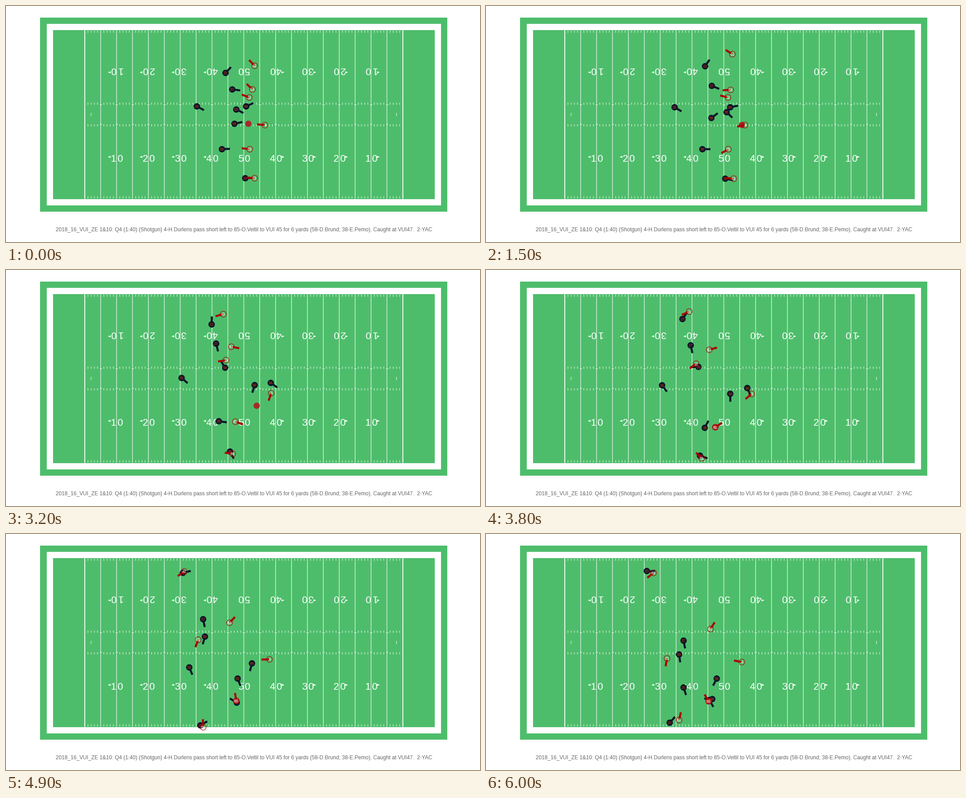
A matplotlib script for the animation above (6100 ms loop, 1058x529 px).

```python
import numpy as np
import matplotlib.pyplot as plt
from matplotlib.animation import FuncAnimation
from matplotlib.patches import Circle, Polygon, Rectangle

WIDTH, HEIGHT, DPI = 1058, 529, 64
FRAMES, INTERVAL = 61, 100
YARD, LEFT, BOTTOM, FIELD_W = 7.1, 104.8, 432.6, 160 / 3
GREEN, NAVY, ORANGE, RED, BROWN = "#4ebd6b", "#0b162a", "#c83803", "#aa0000", "#a52a2a"
RADIUS, STICK = 6.6, 17.8
DIGIT_HEIGHT = 0.7

plt.rcParams["font.family"] = "Liberation Sans"
fig = plt.figure(figsize=(WIDTH / DPI, HEIGHT / DPI), dpi=DPI, facecolor="white")
ax = fig.add_axes([0, 0, 1, 1])
ax.set_xlim(0, WIDTH)
ax.set_ylim(HEIGHT, 0)
ax.axis("off")


def pt(px):
    return px * 72 / DPI


def field_x(yards):
    return LEFT + YARD * np.asarray(yards, float)


def field_y(yards):
    return BOTTOM - YARD * np.asarray(yards, float)


def label(x, y, text, size, color, z, rotation=0):
    return ax.text(x, y, text, fontsize=pt(size), color=color, zorder=z, ha="center",
                   va="baseline", rotation=rotation, rotation_mode="anchor")


def slab(margin, color, z):
    ax.add_patch(Rectangle((field_x(-margin), field_y(-margin)),
                           YARD * (120 + 2 * margin), -YARD * (FIELD_W + 2 * margin),
                           facecolor=color, linewidth=0, zorder=z))


def vertical(yards, low, high, width=1.0):
    ax.vlines(field_x(yards), field_y(low), field_y(high), colors="white",
              linewidth=pt(width), zorder=1, snap=False)


def yard_number(yards, y, flip):
    """Two spaced digits, upside down on the far side, with a goal arrow."""
    x, size, spread = field_x(yards), 22, 7
    up = -1 if flip else 1
    for digit, offset in zip(str(50 - abs(yards - 60)), (-spread, spread)):
        label(x + up * offset, y + up * size * DIGIT_HEIGHT / 2, digit, size, "white", 1,
              rotation=180 if flip else 0)
    if yards != 60:
        side, arrow_y = np.sign(yards - 60), y - up * 3
        ax.add_patch(Polygon([(x + side * 19.7, arrow_y), (x + side * 13.4, arrow_y - 2.3),
                              (x + side * 13.4, arrow_y + 2.3)],
                             facecolor="white", linewidth=0, zorder=1))


def draw_field():
    slab(4, GREEN, 0)
    slab(2, "white", 0.1)
    slab(0, GREEN, 0.2)

    fives = np.arange(15, 110, 5)
    singles = [y for y in range(11, 110) if y % 5]
    vertical(fives, 0, FIELD_W, 1.1)
    vertical([10, 110], 0, FIELD_W, 1.9)
    hashes = (23.58, 29.75)
    tick = 2 / 3
    for low in (tick / 4, FIELD_W - tick * 1.25, hashes[0] - tick, hashes[1]):
        vertical(singles, low, low + tick)
    for y in hashes:
        ax.hlines([field_y(y)] * len(fives), field_x(fives - tick / 2),
                  field_x(fives + tick / 2), colors="white", linewidth=pt(1), zorder=1)
    vertical([12, 108], FIELD_W / 2 - 0.5, FIELD_W / 2 + 0.5)

    for yards in range(20, 101, 10):
        yard_number(yards, 341.3, flip=False)
        yard_number(yards, 145.7, flip=True)
    label(530.8, 505.3, "2018_16_VUI_ZE 1&10: Q4 (1:40) (Shotgun) 4-H.Durlens pass short "
          "left to 85-O.Veltil to VUI 45 for 6 yards (58-D.Brund; 38-E.Pemo). "
          "Caught at VUI47.  2-YAC", 11.88, "#666666", 1)


KEY_TIMES = np.array([0, 1500, 3200, 4900, 6000], float)
SNAP, HANDLED, THROW, CATCH = 1000, 1620, 2850, 3750
TURN, END = 3200, 6000


def spline(points, t):
    """Cubic Hermite path through the points at KEY_TIMES."""
    slopes = np.gradient(points, KEY_TIMES, axis=0)
    i = min(np.searchsorted(KEY_TIMES, t, side="right") - 1, len(KEY_TIMES) - 2)
    h = KEY_TIMES[i + 1] - KEY_TIMES[i]
    u = (t - KEY_TIMES[i]) / h
    return ((1 + 2 * u) * (1 - u) ** 2 * points[i] + u * (1 - u) ** 2 * h * slopes[i]
            + u * u * (3 - 2 * u) * points[i + 1] + u * u * (u - 1) * h * slopes[i + 1])


def heading(turn, t):
    """Ease between three headings, turning fastest around the throw."""
    first, middle, last = turn
    if t < TURN:
        return first + (middle - first) * (t / TURN) ** 2
    return last + (middle - last) * ((END - t) / (END - TURN)) ** 2


class Player:
    def __init__(self, number, home, path, turn):
        self.path, self.turn = np.array(path, float), turn
        z = 6 if home else 2
        edge = RED if home else NAVY
        self.stick, = ax.plot([], [], color=edge, linewidth=pt(4.5), zorder=z,
                              solid_capstyle="butt")
        self.disc = Circle((0, 0), RADIUS, facecolor="none" if home else NAVY,
                           edgecolor=edge, linewidth=pt(1.1), zorder=z + 1)
        ax.add_patch(self.disc)
        self.text = label(0, 0, str(number), 9, "white" if home else ORANGE, z + 2)
        self.artists = [self.stick, self.disc, self.text]

    def position(self, t):
        return spline(self.path, t)

    def pose(self, t):
        x, y = self.position(t)
        a = np.radians(heading(self.turn, t))
        self.stick.set_data([x, x + STICK * np.cos(a)], [y, y - STICK * np.sin(a)])
        self.disc.center = (x, y)
        self.text.set_position((x, y + 9 * DIGIT_HEIGHT / 2 + 0.3))


players = {}


def away(number, *path, turn):
    players[number] = Player(number, False, path, turn)


def home(number, *path, turn):
    players[number] = Player(number, True, path, turn)


draw_field()
away(23, (490, 150), (489, 135), (459, 122), (395, 87), (359, 83), turn=(47, 89, 0))
away(27, (505, 187), (504, 179), (469, 165), (440, 191), (441, 239), turn=(-7, -76, -79))
away(26, (426, 225), (421, 227), (392, 242), (409, 299), (441, 344), turn=(-28, -41, -72))
away(58, (514, 232), (537, 238), (555, 258), (517, 324), (499, 372), turn=(-26, -107, -62))
away(94, (536, 225), (545, 227), (591, 253), (549, 290), (515, 324), turn=(25, -36, -117))
away(59, (510, 264), (503, 251), (489, 219), (444, 230), (431, 270), turn=(13, 122, 278))
away(38, (482, 321), (483, 321), (475, 339), (515, 378), (505, 370), turn=(3, -8, 177))
away(20, (534, 386), (534, 387), (500, 407), (434, 429), (410, 423), turn=(3, -62, 48))
home(41, (555, 134), (550, 108), (485, 99), (398, 84), (374, 87), turn=(134, 195, 219))
home(84, (550, 187), (546, 188), (503, 172), (499, 199), (501, 213), turn=(136, 349, 418))
home(11, (543, 205), (540, 205), (491, 202), (429, 237), (404, 279), turn=(159, 190, 260))
home(4, (578, 267), (578, 267), (592, 276), (588, 281), (571, 287), turn=(174, 251, 169))
home(85, (544, 321), (541, 321), (512, 340), (514, 374), (497, 375), turn=(173, 340, 481))
home(81, (555, 386), (553, 387), (506, 412), (440, 433), (431, 417), turn=(175, 172, 77))

passer, receiver = players[4], players[85]
SPOT = np.array([541, 264])
ball = Circle(SPOT, 7, facecolor=BROWN, linewidth=0, zorder=5)
ax.add_patch(ball)


def flight(start, end, t, leave, arrive):
    return start + (end - start) * np.clip((t - leave) / (arrive - leave), 0, 1)


def ball_position(t):
    """Snapped to the passer, thrown, then carried by the receiver."""
    if t < HANDLED:
        return flight(SPOT, passer.position(HANDLED), t, SNAP, HANDLED)
    if t < THROW:
        return passer.position(t)
    if t < CATCH:
        return flight(passer.position(THROW), receiver.position(CATCH), t, THROW, CATCH)
    return receiver.position(t)


def update(frame):
    t = frame * INTERVAL
    for player in players.values():
        player.pose(t)
    ball.center = ball_position(t)
    return [ball] + [artist for p in players.values() for artist in p.artists]


anim = FuncAnimation(fig, update, frames=FRAMES, interval=INTERVAL,
                     init_func=lambda: update(0), repeat=True, repeat_delay=0)
plt.show()
```
